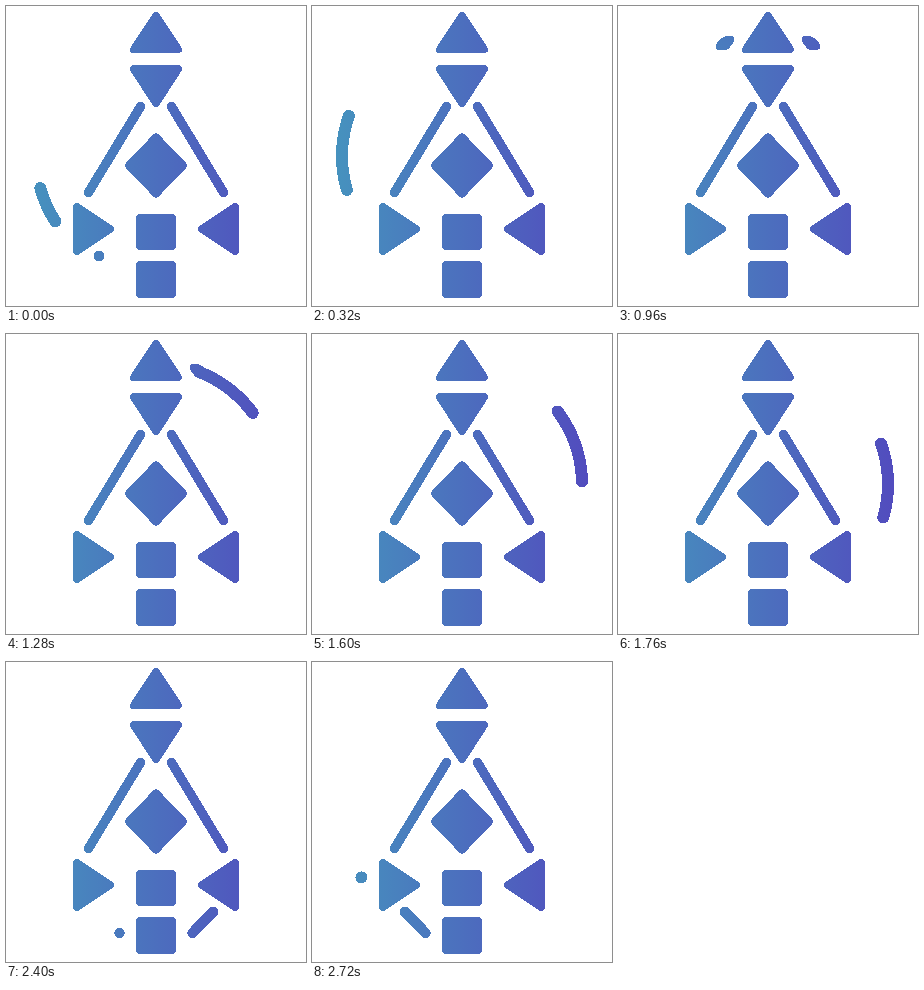
An HTML page that plays this animation: 300x300 px, repeating every 2880 ms.

```html
<!DOCTYPE html>
<html lang="en">
<head>
<meta charset="utf-8">
<title>Orbiting dash</title>
<style>
  html, body { margin: 0; width: 100%; height: 100%; overflow: hidden; background: #fff; }
  svg { display: block; width: 100vw; height: 100vh; shape-rendering: crispEdges; }
  .solid { stroke-width: 8; stroke-linejoin: round; }
  .line { fill: none; stroke-linecap: round; stroke-linejoin: round; }
</style>
</head>
<body>
<svg viewBox="0 0 300 300">
  <defs>
    <linearGradient id="ink" gradientUnits="userSpaceOnUse" x1="24" y1="150" x2="276" y2="150">
      <stop offset="0" stop-color="#4692be"/>
      <stop offset="1" stop-color="#524cbe"/>
    </linearGradient>
  </defs>
  <g fill="url(#ink)" stroke="url(#ink)" stroke-width="0">
    <path class="solid" d="M150 10L172 43.4H128Z M128 63H172L150 97Z
      M150 131.5L177 159.5L150 187.5L123 159.5Z
      M71 201V245L104 223Z M229 201V245L196 223Z"/>
    <rect x="130" y="208" width="40" height="36" rx="4"/>
    <rect x="130" y="255" width="40" height="37" rx="4"/>
    <path class="line" stroke-width="9.4" d="M134.5 100.5L82.5 186.5 M165.5 100.5L217.5 186.5"/>
    <path class="line" id="arcs" stroke-width="12"/>
    <path class="line" id="feet" stroke-width="10.5"/>
    <ellipse id="tipL" cx="107" cy="37" rx="10.3" ry="5.8" transform="rotate(-32 107 37)"/>
    <ellipse id="tipR" cx="193" cy="37" rx="10.3" ry="5.8" transform="rotate(32 193 37)"/>
  </g>
</svg>
<script>
const STEP = 160, COUNT = 18;
const LOW = -33, HIGH = 69, SPEED = 17.5;   // ring ends in degrees, degrees per step
const ARC = (HIGH - LOW) / SPEED, FOOT = 0.8; // lengths, in steps of travel
const DASH = 2.05, STUB = 0.9;

const el = id => document.getElementById(id);
const clamp = k => Math.min(1, Math.max(0, k));

// side is -1 on the left, 1 on the right; k runs 0..1 upwards or inwards
function ring(side, k) {
  const a = (LOW + (HIGH - LOW) * k) * Math.PI / 180;
  return [150 + side * 120 * Math.cos(a), 150 - 120 * Math.sin(a)];
}
const foot = (side, k) => [150 + side * (57 - 20.5 * k), 250 + 21 * k];

// Each piece: when the dash enters, how long it is, and where it runs
const leftArc = { start: 17, len: ARC, at: k => ring(-1, k) };
const rightArc = { start: 6.13, len: ARC, at: k => ring(1, 1 - k) };
const rightFoot = { start: 13, len: FOOT, at: k => foot(1, k) };
const leftFoot = { start: 15.2, len: FOOT, at: k => foot(-1, 1 - k) };

// Visible part of a piece as [from, to], or null while the dash is elsewhere
function span({ start, len }, step) {
  const head = (step - start + COUNT + 0.5) % COUNT - 0.5;
  let tail = head - DASH;
  if (tail > len + 0.5) return null;
  if (tail > 0 && len - tail < STUB) tail = len; // a short stub shrinks to a dot
  return [clamp(tail / len), clamp(head / len)];
}

function trace(piece, step) {
  const part = span(piece, step);
  if (!part) return "";
  const [from, to] = part, n = 16;
  const points = Array.from({ length: n + 1 }, (_, j) =>
    piece.at(from + (to - from) * j / n).map(v => v.toFixed(2)).join(" "));
  return "M" + points.join("L");
}

function show(node, on) {
  node.setAttribute("visibility", on ? "visible" : "hidden");
}

function draw(step) {
  el("arcs").setAttribute("d", trace(leftArc, step) + trace(rightArc, step));
  el("feet").setAttribute("d", trace(rightFoot, step) + trace(leftFoot, step));
  const left = span(leftArc, step), right = span(rightArc, step);
  show(el("tipL"), left && left[1] === 1);
  show(el("tipR"), right && right[0] === 0);
}

const begin = performance.now();
let last = -1;
function tick() {
  const step = Math.floor((performance.now() - begin) / STEP) % COUNT;
  if (step !== last) draw(last = step);
  requestAnimationFrame(tick);
}
tick();
</script>
</body>
</html>
```
